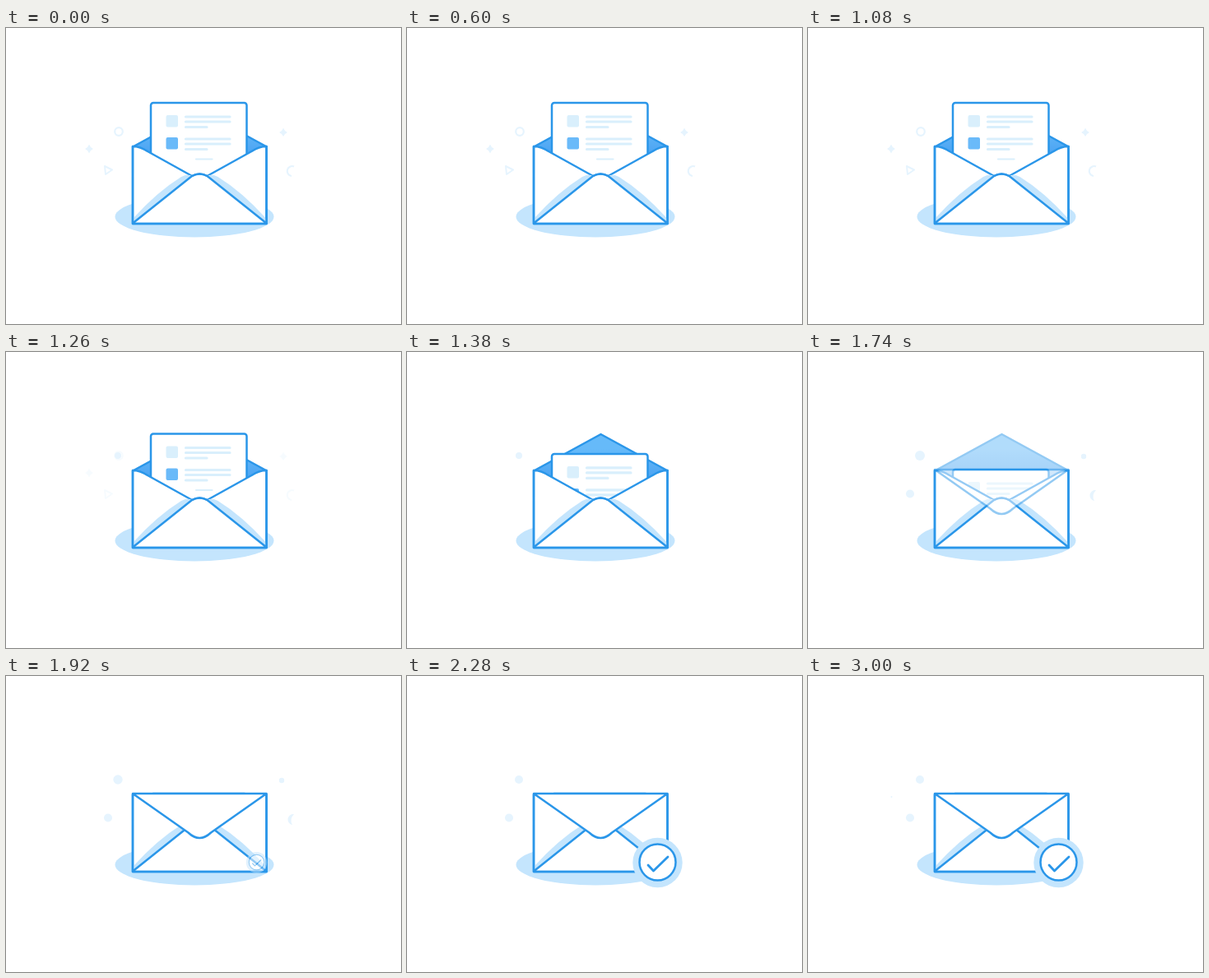
Write an HTML page that moves like this. It is 480 by 360 pixels and loops after 3060 ms.

```html
<!DOCTYPE html>
<html lang="en">
<head>
<meta charset="utf-8">
<title>Envelope</title>
<style>
html, body { margin: 0; height: 100%; overflow: hidden; background: #fff; }
svg { display: block; width: 480px; height: 360px; }
.ink { stroke: #2a96e9; stroke-width: 2.5; stroke-linejoin: round; stroke-linecap: round; }
.white { fill: #fff; }
.line { fill: none; }
.pale { fill: #c4e5fd; }
.faint { fill: #e6f4fe; }
.text { stroke: #d9effc; stroke-width: 3.2; stroke-linecap: round; }
</style>
</head>
<body>
<svg viewBox="0 0 480 360">
  <defs>
    <linearGradient id="blue" gradientUnits="userSpaceOnUse" x1="0" y1="118" x2="0" y2="152">
      <stop offset="0" stop-color="#66baf9"/>
      <stop offset="1" stop-color="#4ca4f2"/>
    </linearGradient>
    <path id="fold" d="M154 237L226 180Q221 177 213 181Q184 199 155 231Z"/>
    <g id="row">
      <path d="M218.500 108H272M218.500 114H272M218.500 120.500H244" class="text"/>
    </g>
  </defs>

  <ellipse cx="229" cy="229.500" rx="96.500" ry="25" class="pale"/>

  <g id="shapes">
    <path d="M101 141.500L103 145L106 147L103 149L101 152.500L99 149L96 147L99 145Z" class="faint"/>
    <circle cx="137" cy="126" r="4.800" fill="none" stroke="#e6f4fe" stroke-width="2.200"/>
    <path d="M120 168L129 172.500L121 178Z" fill="none" stroke="#e6f4fe" stroke-width="2" stroke-linejoin="round"/>
    <path d="M337 121.500L339 125L342 127L339 129L337 132L335 129L332 127L335 125Z" class="faint"/>
    <path d="M350 168.500A6 6 0 1 0 347 180" fill="none" stroke="#e6f4fe" stroke-width="2.200"/>
  </g>
  <g id="dots" class="faint">
    <circle cx="101.500" cy="147"/>
    <circle cx="136" cy="126"/>
    <circle cx="124" cy="172.500"/>
    <circle cx="335" cy="127"/>
    <path d="M350 168A6 6 0 1 0 348 181Q344 174 350 168Z"/>
  </g>

  <path id="open" d="M155 144L235.500 100L316 144L235.500 184Z" fill="url(#blue)" class="ink"/>

  <g id="paper">
    <rect x="176" y="91" width="116.500" height="92" rx="3" class="white ink"/>
    <rect x="194.500" y="106" width="14.500" height="14.500" rx="2" fill="#d9effc"/>
    <use href="#row"/>
    <rect x="194.500" y="133" width="14.500" height="14.500" rx="2" fill="#6abaf9"/>
    <use href="#row" y="27"/>
    <path d="M231 159.500H250.500" class="text" style="stroke-width:2.200"/>
  </g>

  <path d="M154 144Q163 144 172 150L226 180Q235.250 175 244.500 180L298.500 150Q307.500 144 316.500 144V238H154Z" class="white ink"/>
  <use href="#fold" class="pale"/>
  <use href="#fold" class="pale" transform="matrix(-1 0 0 1 470.500 0)"/>
  <path d="M154 237.500L226 180Q235.250 175 244.500 180L316.500 237.500M154 144V238H316.500V144" class="line ink"/>

  <path id="closed" d="M154 143H316.500L249 190.500Q235.250 203.500 221.500 190.500Z" class="white ink"/>

  <g id="badge">
    <circle cx="304.500" cy="227" r="30.200" class="pale"/>
    <circle cx="304.500" cy="226.500" r="22" class="white ink"/>
    <path d="M293 230L299.500 237L317 220" class="line ink" style="stroke-width:2.800"/>
  </g>
</svg>
<script>
const LOOP = 3060, STEP = 60;
const el = id => document.getElementById(id);
const span = (t, from, to) => Math.min(1, Math.max(0, (t - from) / (to - from)));
const inOut = p => p < .5 ? 2 * p * p : 1 - 2 * (1 - p) ** 2;
const out = p => 1 - (1 - p) ** 3;
const [tiny, ring, wedge, spark, moon] = el('dots').children;

function draw(t) {
  const fade = span(t, 1620, 1860);
  const pop = out(span(t, 1860, 2220));
  const late = t >= 1620;

  el('paper').setAttribute('transform', `translate(0 ${52 * inOut(span(t, 1140, 1560))})`);
  el('open').setAttribute('opacity', 1 - fade);
  el('closed').setAttribute('opacity', fade);
  el('badge').setAttribute('opacity', span(t, 1860, 1980));
  el('badge').setAttribute('transform', `translate(304.5 226.5) scale(${pop}) translate(-304.5 -226.5)`);

  // Faint confetti collapses into dots as the letter closes.
  const early = 1 - span(t, 1140, 1320);
  const brief = late ? 1 - span(t, 1920, 2220) : 0;
  el('shapes').setAttribute('opacity', early);
  tiny.setAttribute('r', t >= 2760 ? 1 : 0);
  ring.setAttribute('r', t < 1260 ? 0 : late ? 6 - span(t, 1800, 2160) : 4);
  wedge.setAttribute('r', late ? 5 : 0);
  spark.setAttribute('r', 3.2 * brief);
  moon.setAttribute('opacity', brief);
}

function tick() {
  const t = performance.now() % LOOP;
  draw(Math.floor(t / STEP) * STEP);
  requestAnimationFrame(tick);
}
tick();
</script>
</body>
</html>
```
